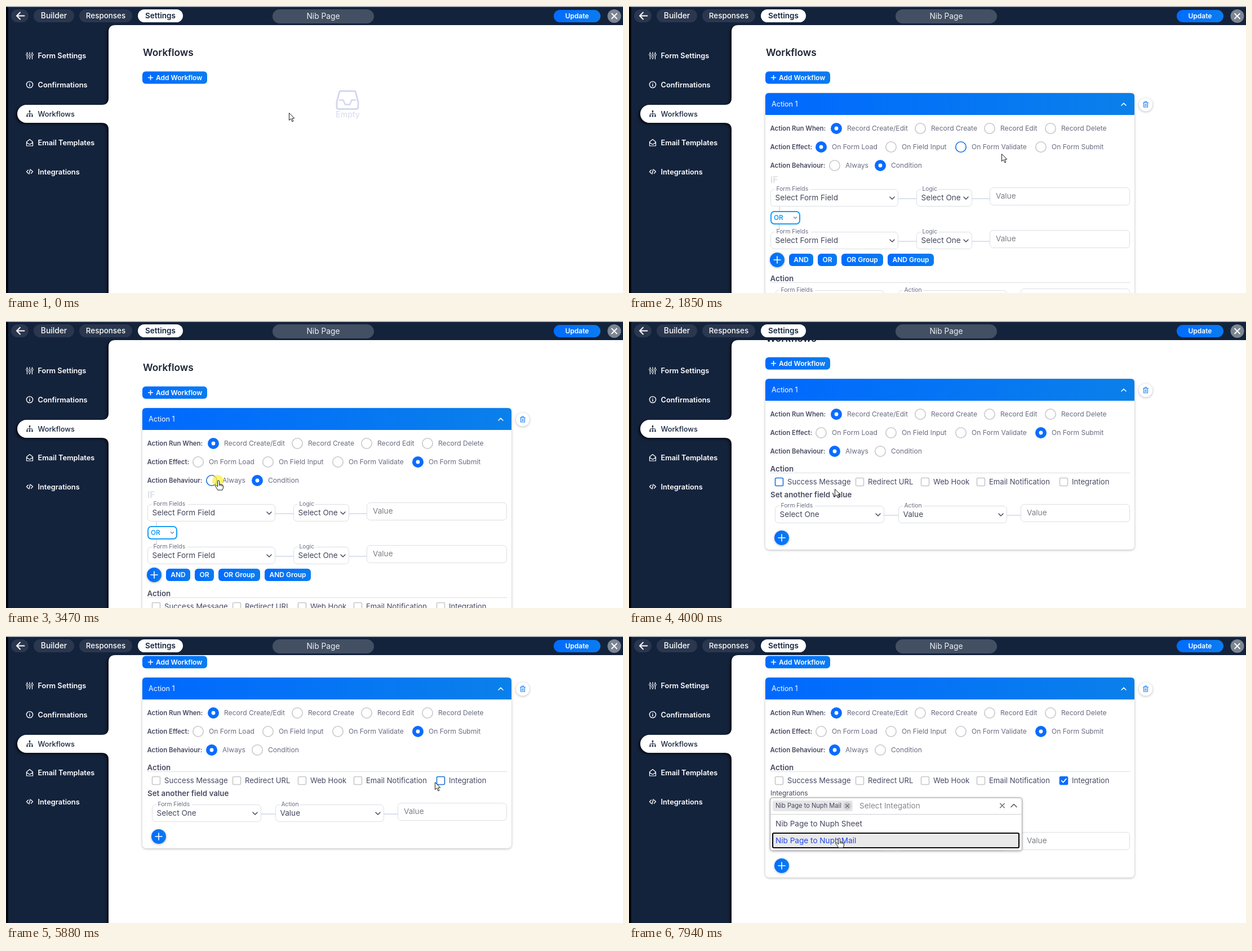
An HTML page for the animation above (8000 ms loop, 1095 by 511 pixels).

```html
<!DOCTYPE html>
<html lang="en">
<head>
<meta charset="utf-8">
<title>Workflow settings</title>
<style>
html, body { margin: 0; width: 100%; height: 100%; overflow: hidden; background: #14233c; }
svg { display: block; width: 1095px; height: 511px; font-family: Inter, "Open Sans", sans-serif; }
text { white-space: pre; }
.b { font-weight: 600; }
.m { font-weight: 500; }
.c { text-anchor: middle; }
.line { fill: none; stroke-linecap: round; stroke-linejoin: round; }
.lift { filter: drop-shadow(0 1px 2px rgba(0, 0, 0, .28)); }
.field { fill: #fff; stroke: #dcdee3; }
.field.hot { stroke: #a9abb3; }
.link { stroke: #cfd6ec; stroke-width: 1.4; }
.ring { fill: #fff; stroke: #c8c8cb; stroke-width: 1.6; }
.hot .ring { stroke: #1c6fdc; }
.on .ring { fill: #0a6cff; stroke: #0a6cff; }
.mark { display: none; }
.on .mark { display: inline; }
.pick { fill: #2347e6; }
</style>
</head>
<body>
<svg id="stage" viewBox="0 0 1095 511"></svg>
<script>
const NAVY = '#14233c', BLUE = '#0a6cff', INK = '#44475c', GREY = '#6a6c80', HEAD = '#484a62';
const APP = 'Nib Page', SHEET = APP + ' to Nuph Sheet', MAIL = APP + ' to Nuph Mail';
const LOOP = 8000, STEP = 80;

// Markup helpers; text is placed by the middle of its capitals.
const text = (x, y, size, str, fill = INK, cls = '') =>
  `<text x="${x}" y="${y + size * .36}" font-size="${size}" fill="${fill}" class="${cls}">${str}</text>`;
const rect = (x, y, w, h, r, fill, more = '') =>
  `<rect x="${x}" y="${y}" width="${w}" height="${h}" rx="${r}" fill="${fill}" ${more}/>`;
const line = (d, color, w = 1.4, more = '') =>
  `<path class="line" d="${d}" stroke="${color}" stroke-width="${w}" ${more}/>`;
const group = (id, body, more = '') => `<g id="${id}" ${more}>${body}</g>`;
const chevron = (x, y, color, up = false, s = 4) =>
  line(`M${x - s} ${y + (up ? s / 2 : -s / 2)}l${s} ${up ? -s : s}l${s} ${up ? s : -s}`, color, 1.5);
const plus = (x, y, s, color = '#fff') => line(`M${x - s} ${y}h${2 * s}M${x} ${y - s}v${2 * s}`, color, 1.6);
const cross = (x, y, s, color, w = 1.4) =>
  line(`M${x - s} ${y - s}l${2 * s} ${2 * s}M${x + s} ${y - s}l${-2 * s} ${2 * s}`, color, w);
const button = (x, y, w, str) => rect(x, y, w, 22, 6, 'url(#blue)') + text(x + w / 2, y + 11, 12, str, '#fff', 'b c');
const round = (x, y) => `<circle class="lift" cx="${x}" cy="${y}" r="13" fill="url(#blue)"/>` + plus(x, y, 6);
const select = (x, y, w, label, str, id = '') =>
  `<rect ${id && `id="${id}"`} class="field" x="${x + .5}" y="${y + .5}" width="${w - 1}" height="30" rx="6"/>` +
  rect(x + 8, y - 4, label.length * 5.4 + 4, 8, 0, '#fff') +
  text(x + 10.5, y - 1, 10.3, label, GREY) + text(x + 8.5, y + 15, 13.6, str) + chevron(x + w - 11, y + 16, INK);
const input = (x, y, w) =>
  `<rect class="field" x="${x + .5}" y="${y + .5}" width="${w - 1}" height="31" rx="6"/>` +
  text(x + 11, y + 15.5, 13.6, 'Value', '#7c7e86');

// Choices: [centre x, y, label]
const radios = [
  [368, 218, 'Record Create/Edit'], [517, 218, 'Record Create'], [640, 218, 'Record Edit'], [748, 218, 'Record Delete'],
  [341, 251, 'On Form Load'], [465, 251, 'On Field Input'], [589, 251, 'On Form Validate'], [731, 251, 'On Form Submit'],
  [365, 284, 'Always'], [446, 284, 'Condition']
];
const checks = [
  [266.5, 23.5, 'Success Message'], [409.5, 23.5, 'Redirect URL'], [525.5, 23.5, 'Web Hook'],
  [624.5, 23.5, 'Email Notification'], [771.5, 23.5, 'Integration']
];
const radio = ([x, y, label]) =>
  `<g class="radio"><circle class="ring" cx="${x}" cy="${y}" r="9.2"/>` +
  `<circle class="mark" cx="${x}" cy="${y}" r="3.4" fill="#fff"/>${text(x + 19, y, 12.1, label, GREY)}</g>`;
const check = ([x, y, label]) =>
  `<g class="check"><rect class="ring" x="${x - 7}" y="${y - 7}" width="14" height="14" rx="2"/>` +
  line(`M${x - 4} ${y}l3 3.2l5.2-6.2`, '#fff', 1.8).replace('"line"', '"line mark"') +
  `${text(x + 14.5, y - .5, 13.1, label, HEAD)}</g>`;

const defs = `<defs>
  <linearGradient id="blue"><stop stop-color="#006cff"/><stop offset="1" stop-color="#0a7cf0"/></linearGradient>
  <linearGradient id="bar"><stop stop-color="#0069ff"/><stop offset="1" stop-color="#0a80ea"/></linearGradient>
  <clipPath id="view"><path d="M1095 34H194Q182 34 182 46V511H1095Z"/></clipPath>
  <clipPath id="cardClip"><rect id="cardRect" x="230" y="155" width="680" height="39"/></clipPath>
  <clipPath id="condClip"><rect id="condRect" x="242" y="298" width="656" height="170"/></clipPath>
</defs>`;

const pill = (x, w, fill) => rect(x, 6, w, 23, 11.5, fill);
const nav =
  rect(0, 0, 1095, 511, 0, NAVY) + rect(0, 1, 4, 510, 0, '#02050a') + rect(0, 0, 1095, 1.4, 0, '#e6e8eb') +
  pill(9, 31, '#2a374e') + line('M32.5 17.5H19.5M25 11.5l-6 6l6 6', '#fff', 2) +
  pill(49, 72, '#2a374e') + text(85, 17, 13.8, 'Builder', '#fff', 'm c') +
  pill(130, 94, '#2a374e') + text(177, 17, 13.4, 'Responses', '#fff', 'm c') +
  pill(234, 80, '#fff') + text(274, 17, 13.5, 'Settings', NAVY, 'b c') +
  rect(473, 6, 180, 25, 12.5, '#435064') + text(563, 18, 13.8, APP, '#eef0f3', 'c') +
  rect(972, 7, 83, 22, 11, 'url(#blue)') + text(1013.5, 18, 12, 'Update', '#fff', 'b c') +
  '<circle cx="1079.5" cy="18" r="12" fill="#7c8592"/>' + cross(1079.5, 18, 4.5, '#fff', 1.8);

const side =
  `<path fill="#fff" style="filter:drop-shadow(-3px 2px 2px rgba(0,0,0,.65))"
    d="M1099 34H194Q182 34 182 46V164Q182 176 170 176H36A16 16 0 0 0 36 208H170Q182 208 182 220V515H1099Z"/>` +
  [['Form Settings', 88.5], ['Confirmations', 140], ['Workflows', 192], ['Email Templates', 243.5], ['Integrations', 295]]
    .map(([s, y]) => text(56.5, y, 12.8, s, s === 'Workflows' ? NAVY : '#fff', s === 'Workflows' ? 'm' : 'b')).join('') +
  [37.5, 42, 46.5].map((x, i) => line(`M${x} 82.5V94.5`, '#fff', 1.2) +
    rect(x - 1.6, i === 1 ? 89 : 85, 3.2, 3.4, 1, NAVY, 'stroke="#fff"')).join('') +
  '<circle cx="42" cy="140" r="5.6" fill="none" stroke="#fff" stroke-width="1.4"/>' + line('M42 139.5v3.2M42 137.2v.1', '#fff', 1.5) +
  line('M42 188.5v6M37.5 194.5v-2.5h9v2.5', NAVY, 1) +
  [[40.7, 186], [36.2, 194.5], [40.7, 194.5], [45.2, 194.5]].map(([x, y]) => rect(x, y, 2.6, 2.8, .8, NAVY)).join('') +
  line('M36.5 242l5.5-4.5l5.5 4.5v7h-11zM36.5 243l5.5 3.5l5.5-3.5', '#fff', 1.2) +
  line('M39.5 292l-3 3l3 3M44.5 292l3 3l-3 3M43 291l-2 8', '#fff', 1.4);

const empty = group('empty',
  line('M594 151.5h24q2 0 2.5 2l4.5 17.5v9q0 3.5-3.5 3.5h-31q-3.5 0-3.5-3.5v-9l4.5-17.5q.5-2 2.5-2z', '#d3d8ef', 3) +
  line('M592 167.500h6.500l3.500 8h8l3.500-8h6.500', '#d3d8ef', 2.6) + text(606.5, 193, 14.2, 'Empty', '#d5daf0', 'c'));

const trash =
  '<circle class="lift" cx="917" cy="175.500" r="12" fill="#fff"/>' +
  line('M912.500 172h9M915.500 171.500v-1.500h3v1.500M913.500 172.500v7.500h7v-7.500M916 174.500v3.500M918 174.500v3.500', '#1480f5', 1.1);

const dot = (x, s) => `<circle cx="${x}" cy="171.500" r="4.2" fill="#12b560"/>` + text(x + 8.5, 171.5, 11.4, s, GREY);
const closed = group('closed',
  text(253, 174, 12.6, 'Action 1', INK) + dot(565.5, 'Record Create/Edit') + dot(688, 'On Load') + dot(754, 'With Condition') +
  chevron(878, 175, '#0b62d0'));

const condRow = y =>
  line(`M478 ${y + 17}H640`, '#cfd6ec') +
  select(251, y, 227, 'Form Fields', 'Select Form Field') + select(510, y, 99, 'Logic', 'Select One') + input(640, y - 3, 249);
const cond =
  text(251, 309.5, 15.5, 'IF', '#dcdee2', 'b') + line('M267 357V402', '#cfd6ec') + condRow(326) + condRow(402) +
  rect(252, 366, 51, 22, 6, '#fff', 'stroke="#189cf5" stroke-width="2"') +
  text(257, 377, 11.8, 'OR', '#189cf5', 'b') + chevron(295, 377, '#8a8d96', false, 2.5) +
  round(263, 452) + button(284, 441, 43, 'AND') + button(335, 441, 34, 'OR') +
  button(377, 441, 74, 'OR Group') + button(459, 441, 82, 'AND Group');

// Laid out around the "Action" heading at y = 0
const fields = group('fields',
  text(251, 46, 13.3, 'Set another field value', HEAD, 'b').replace('<text', '<text id="another"') +
  line('M453 83H695', '#cfd6ec') + select(259, 66, 194, 'Form Fields', 'Select One', 'fieldBox') +
  select(478, 66, 193, 'Action', 'Value') + input(695, 63, 194) + round(271, 123));

const list = group('list',
  text(251, 46, 11.9, 'Integrations', INK) +
  rect(251, 54, 446, 30, 4, '#fff', 'stroke="#cfd1d6"') +
  group('menu',
    rect(250.5, 54, 447, 94, 4, '#fff', 'class="lift" stroke="#a8a8ac"') + line('M251 83.500H697', '#cfcfd2', 1) +
    group('ring', rect(255, 117, 437, 26, 2, '#e9e9e9', 'stroke="#0b0b0b" stroke-width="2.2"')) +
    group('sheet', text(260, 100, 13.6, SHEET, '')) + group('mail', text(260, 130, 13.6, MAIL, ''))) +
  group('hint', text(0, 68, 13.6, 'Select Integation', '#85878f')) +
  group('chip', rect(255, 59, 142, 19, 3, '#e6e6e8') + text(260, 68, 11.1, MAIL, INK) +
    '<circle cx="387.500" cy="68.500" r="7" fill="#cbccd0"/>' + cross(387.5, 68.5, 3, '#666', 1.1) + cross(662.5, 68, 3.8, '#666')) +
  group('down', chevron(683, 69, '#555', false, 5)) + group('up', chevron(683, 68, '#555', true, 5)));

const opened = group('opened',
  '<path d="M242 194V161q0-6 6-6H891q6 0 6 6V194Z" fill="url(#bar)"/>' +
  text(253, 174, 12.6, 'Action 1', '#fff') + chevron(878, 175, '#fff', true) +
  text(250.5, 218, 11.4, 'Action Run When:', HEAD, 'b') + text(250.5, 251, 11.4, 'Action Effect:', HEAD, 'b') +
  text(250.5, 284, 11.4, 'Action Behaviour:', HEAD, 'b') + radios.map(radio).join('') +
  group('cond', cond, 'clip-path="url(#condClip)"') +
  group('rest', text(250.5, 0, 13.3, 'Action', HEAD, 'b') + line('M251 7.500H889', '#dcdee3', 1) +
    group('checks', checks.map(check).join('')) + fields + list),
  'clip-path="url(#cardClip)"');

const page = `<g clip-path="url(#view)">` + group('page',
  text(243, 83, 17.3, 'Workflows', '#1c2433', 'b') + rect(242, 116.5, 115, 22, 6, 'url(#blue)') +
  plus(256.5, 127.5, 4) + text(266, 127.5, 12, 'Add Workflow', '#fff', 'b') + empty +
  group('card', rect(242, 155, 655, 39, 7, '#fff', 'id="cardBg" class="lift"') + trash + closed + opened)) + '</g>';

const pointer = group('pointer',
  '<circle id="glow" cx="-1" cy="0" r="10" fill="#fff03a" opacity=".75"/>' +
  '<g fill="#fff" stroke="#1c1c1c" stroke-linejoin="round">' +
  '<path id="arrow" d="M.5 .5V13.500L3.500 10.700L6 16L8 15L5.700 10H9.800Z"/>' +
  '<path id="hand" d="M-1.500 1.500a1.500 1.500 0 0 1 3 0V6.500l5 1c1.500.3 2 1.200 2 2.500V13l-1.500 4H-1.500C-2 14.500-5 11.500-6 9.500c-.5-1.500 1.200-2 2-1l2.500 2.500ZM1.500 6.500v3M4 7v3M6.500 7.500v3"/>' +
  '<path id="beam" fill="none" d="M-3-6.500h2l1 1l1-1h2M0-5.500V5.500M-3 6.500h2l1-1l1 1h2"/></g>');

const $ = id => document.getElementById(id);
$('stage').innerHTML = defs + nav + side + page + pointer;
const radioEls = [...document.querySelectorAll('.radio')], checkEls = [...document.querySelectorAll('.check')];

// Pointer path: time, x, y, shape
const path = [
  [0, 502, 190, 'arrow'], [80, 486, 184, 'arrow'], [320, 318, 124, 'hand'], [480, 316, 121, 'hand'], [560, 340, 134, 'arrow'],
  [800, 594, 200, 'arrow'], [960, 598, 207, 'arrow'], [1040, 606, 203, 'arrow'], [1200, 640, 178, 'hand'], [1360, 640, 178, 'hand'],
  [1600, 650, 211, 'arrow'], [1840, 661, 263, 'arrow'], [2000, 668, 262, 'arrow'], [2240, 716, 256, 'arrow'],
  [2400, 729, 251, 'hand'], [2640, 729, 251, 'arrow'], [2880, 600, 264, 'arrow'], [3200, 392, 284, 'hand'],
  [3280, 377, 284, 'hand'], [3600, 377, 284, 'hand'], [3760, 368, 290, 'arrow'], [4080, 364, 302, 'arrow'],
  [4240, 364, 290, 'beam'], [4320, 364, 283, 'beam'], [4400, 520, 276, 'arrow'], [4560, 914, 300, 'arrow'],
  [4720, 914, 304, 'arrow'], [4960, 520, 318, 'arrow'], [5120, 310, 300, 'arrow'], [5200, 276, 264, 'arrow'],
  [5520, 560, 267, 'arrow'], [5840, 761, 260, 'arrow'], [5920, 770, 259, 'hand'], [6240, 770, 259, 'hand'],
  [6400, 756, 264, 'arrow'], [6560, 400, 300, 'arrow'], [6640, 382, 302, 'hand'], [7040, 372, 304, 'hand'],
  [7280, 352, 334, 'hand'], [7600, 373, 360, 'hand'], [LOOP, 373, 360, 'hand']
];
const clicks = [[320, 480], [1200, 1280], [2480, 2560], [3440, 3520], [5920, 6080], [6640, 6720], [7760, 7840]];

const ramp = (t, a, b) => { const k = Math.min(1, Math.max(0, (t - a) / (b - a))); return k * k * (3 - 2 * k); };
const show = (id, on) => { $(id).style.display = on ? '' : 'none'; };
const move = (id, x, y) => $(id).setAttribute('transform', `translate(${x} ${y})`);

function pointerAt(t) {
  const i = path.findIndex(k => k[0] > t), a = path[i - 1], b = path[i];
  const k = (t - a[0]) / (b[0] - a[0]);
  return { x: a[1] + (b[1] - a[1]) * k, y: a[2] + (b[2] - a[2]) * k, shape: a[3] };
}

function render(t) {
  const p = pointerAt(t);
  const added = t >= 480, open = ramp(t, 1200, 1520), submit = t >= 2560, always = t >= 3520;
  const fold = 1 - ramp(t, 3520, 3680), scroll = Math.round(81 * ramp(t, 3760, 4160));
  const linked = t >= 6080, menu = t >= 6720, picked = t >= 7840;
  const restY = 315 + 170 * fold, shift = linked ? 52 : submit ? 0 : -45;
  const full = restY + 144 + shift - 155, height = 39 + (full - 39) * open;

  show('empty', !added);
  show('card', added);
  show('closed', !open);
  show('opened', open);
  $('cardBg').setAttribute('height', height);
  $('cardRect').setAttribute('height', height);
  $('condRect').setAttribute('height', 170 * fold);
  move('page', 0, -scroll);
  move('rest', 0, restY);
  move('fields', 0, shift);
  show('another', submit);
  show('checks', submit);
  show('list', linked);
  show('menu', menu);
  show('up', menu);
  show('down', !menu);
  show('chip', picked);
  show('ring', picked);
  move('hint', picked ? 409 : 260, 0);

  const py = p.y + scroll;
  const over = ([x, y, s], top) => open === 1 && p.x > x - 12 && p.x < x + 19 + s.length * 6.2 && Math.abs(py - top - y) < 14;
  const chosen = [0, submit ? 7 : 4, always ? 8 : 9];
  radios.forEach((r, i) => {
    radioEls[i].classList.toggle('on', chosen.includes(i));
    radioEls[i].classList.toggle('hot', over(r, 0));
  });
  checks.forEach((c, i) => {
    checkEls[i].classList.toggle('on', linked && i === 4);
    checkEls[i].classList.toggle('hot', submit && over(c, restY));
  });
  $('fieldBox').classList.toggle('hot', always && !linked && p.x > 259 && p.x < 453 && py > restY + 47 && py < restY + 97);
  $('sheet').setAttribute('class', menu && p.y > 319 && p.y < 349 ? 'pick' : '');
  $('mail').setAttribute('class', menu && p.y >= 349 ? 'pick' : '');
  $('sheet').firstChild.setAttribute('fill', $('sheet').getAttribute('class') ? '#2347e6' : INK);
  $('mail').firstChild.setAttribute('fill', $('mail').getAttribute('class') ? '#2347e6' : INK);

  move('pointer', Math.round(p.x), Math.round(p.y));
  for (const s of ['arrow', 'hand', 'beam']) show(s, s === p.shape);
  show('glow', clicks.some(([a, b]) => t >= a && t < b));
}

const start = performance.now();
function tick() {
  const t = (performance.now() - start) % LOOP;
  render(Math.floor(t / STEP) * STEP);
  requestAnimationFrame(tick);
}
tick();
</script>
</body>
</html>
```
